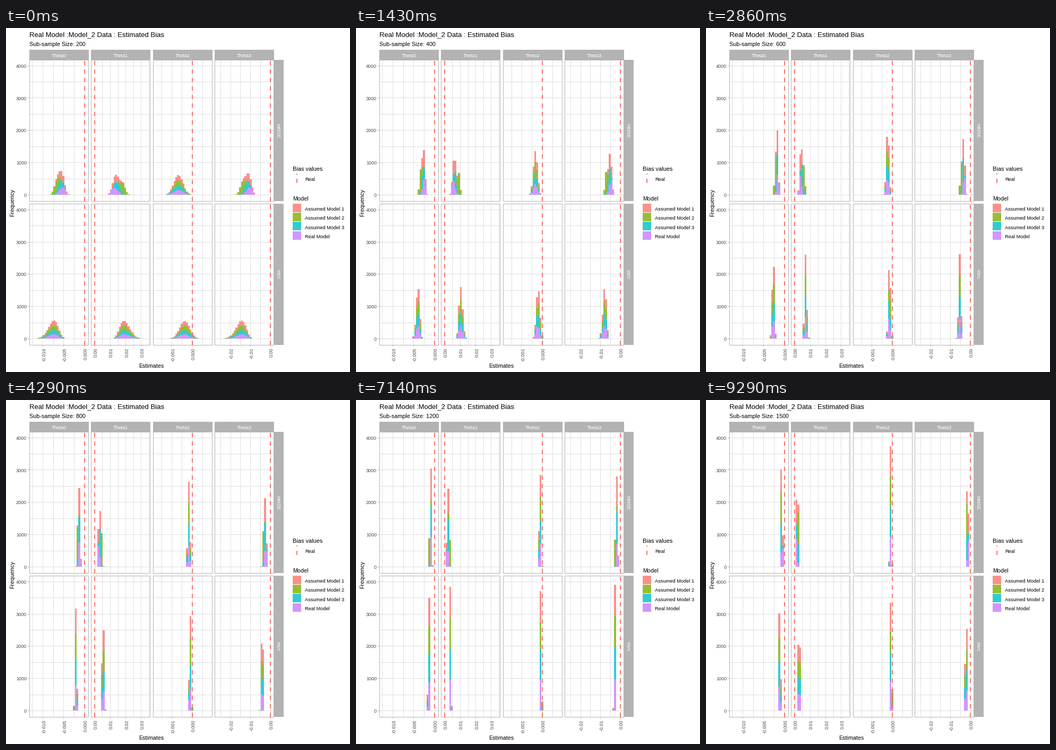
These frames come from a looping animation (648x648 px, 10000 ms). A matplotlib script:

```python
import math

import matplotlib.pyplot as plt
from matplotlib.animation import FuncAnimation
from matplotlib.collections import PolyCollection
from matplotlib.patches import Rectangle

plt.rcParams["font.family"] = "Liberation Sans"

SIZE = 648
LOOP_MS = 10000
FRAMES = 200
SIZES = range(200, 1501, 100)
DRAWS = 1000

GREY, GRID, TICK_TEXT = "#B3B3B3", "#DEDEDE", "#4D4D4D"
RED = "#F8766D"
# Stacked from the baseline upwards
FILLS = ["#C77CFF", "#00BFC4", "#7CAE00", "#F8766D"]
LABELS = ["Real Model", "Assumed Model 3", "Assumed Model 2", "Assumed Model 1"]

PANEL_W, PANEL_H = 111, 266
LEFTS = [44, 160, 277, 393]
TOPS = [60, 331]
BASES = [314.4, 585.4]
PX_PER_COUNT = 0.0608
BIN = 3.363

# x of zero, direction of the bias, major step in px, tick step, decimals,
# first and last labelled tick
COLUMNS = [
    (148.2, -1, 39.4, 0.005, 3, -2, 0),
    (167.2, 1, 29.2, 0.01, 2, 0, 3),
    (351.0, -1, 38.2, 0.001, 3, -1, 0),
    (498.0, -1, 37.4, 0.01, 2, -2, 0),
]

# Bias in bins at n = 1000: the largest per column, and how far each model
# falls short of it, scaled per column.
SHORTFALL = [1.17, 0.73, 0, 0.97]
LARGEST = [[3.17, 3.17, 1.56, 3.17], [3.97, 3.80, 0.85, 3.72]]
SCALE = [[0.87, 1.25, 0, 1.08], [0, 0, -0.25, 0]]


def bias(row, col, model, n):
    """Centre and spread of one model's estimates, before the 1/n scaling."""
    centre = LARGEST[row][col] - SCALE[row][col] * SHORTFALL[model] * (1 - 70 / n)
    if row == 0:
        return centre, 0.6 / centre * (1 + 70 / n)
    return centre * (1 - 22 / n), 0.19 * (1 + 400 / n)


def phi(z):
    return 0.5 * (1 + math.erf(z / math.sqrt(2)))


def cdf(x, centre, spread, skewed):
    if not skewed:
        return phi((x - centre) / spread)
    return phi(math.log(x / centre) * centre / spread) if x > 0 else 0.0


def panel_bars(row, col, n):
    """Stacked bars of one panel, as one list of boxes per model."""
    zero, sign = COLUMNS[col][:2]
    bars = [[] for _ in FILLS]
    for k in range(-8, 30):
        lo, hi = ((k + d) * n / 1000 for d in (-0.5, 0.5))
        x0, x1 = sorted(round(zero + sign * (k + d) * BIN) for d in (-0.5, 0.5))
        total, below = 0, round(BASES[row])
        for model in range(len(FILLS)):
            shape = (*bias(row, col, model, n), col != 2)
            total += DRAWS * (cdf(hi, *shape) - cdf(lo, *shape))
            above = round(BASES[row] - total * PX_PER_COUNT)
            if above < below:
                bars[model].append([(x0, above), (x1, above), (x1, below), (x0, below)])
            below = above
    return bars


def all_bars(n):
    panels = [panel_bars(row, col, n) for row in range(2) for col in range(4)]
    return [sum(boxes, []) for boxes in zip(*panels)]


fig = plt.figure(figsize=(SIZE / 72, SIZE / 72), dpi=72, facecolor="white")
ax = fig.add_axes([0, 0, 1, 1])
ax.set_xlim(0, SIZE)
ax.set_ylim(SIZE, 0)
ax.axis("off")


def rect(x, y, w, h, color, **kw):
    ax.add_patch(Rectangle((x, y), w, h, fc=color, ec="none", aa=False, **kw))


def line(xs, ys, color, width=1, z=1, **kw):
    ax.plot(xs, ys, color=color, lw=width, zorder=z, solid_capstyle="butt",
            dash_capstyle="butt", snap=False, **kw)


def text(x, y, s, size, color="black", ha="left", angle=0):
    return ax.text(x, y, s, fontsize=size, color=color, ha=ha, va="baseline",
                   rotation=angle, rotation_mode="anchor", zorder=6)


def mid(v):
    """Centre of the pixel that holds v."""
    return math.floor(v) + 0.5


def draw_panel(row, col):
    left, top = LEFTS[col], TOPS[row]
    right, bottom = left + PANEL_W, top + PANEL_H
    zero, _, step = COLUMNS[col][:3]
    for half in range(9):
        y = mid(BASES[row] - half * 500 * PX_PER_COUNT)
        line([left, right], [y, y], GRID)
    for half in range(-6, 9):
        x = mid(zero + half * step / 2)
        if left + 2 < x < right - 1:
            line([x, x], [top, bottom], GRID)
    x = round(zero)
    line([x, x], [bottom, top], RED, 2, 4, linestyle=(0, (4, 4)))
    ax.add_patch(Rectangle((left + 0.5, top + 0.5), PANEL_W, PANEL_H, fill=False,
                           ec=GREY, lw=1, zorder=5, snap=False))


for row in range(2):
    for col in range(4):
        draw_panel(row, col)
    for count in range(0, 4001, 1000):
        y = BASES[row] - count * PX_PER_COUNT
        line([41, 44], [mid(y)] * 2, GREY)
        text(39, y + 3.7, str(count), 9, TICK_TEXT, "right")
    rect(505, TOPS[row], 18, PANEL_H, GREY)
    text(509, TOPS[row] + 133, ("mMSE", "mVc")[row], 9, "white", "center", -90)

for col, (zero, _, step, unit, digits, first, last) in enumerate(COLUMNS):
    rect(LEFTS[col], 41, PANEL_W + 1, 19, GREY)
    text(LEFTS[col] + PANEL_W / 2, 55, f"Theta{col}", 9, "white", "center")
    for k in range(first, last + 1):
        x = zero + k * step
        line([mid(x)] * 2, [597, 600], GREY)
        # An ASCII hyphen is the minus sign here
        text(x + 4.7, 602.5, f"{k * unit:.{digits}f}", 9, TICK_TEXT, "right", 90)

text(44, 16, "Real Model :Model_2 Data : Estimated Bias", 13.15)
subtitle = text(44, 34, "", 10.75)
text(274, 640.5, "Estimates", 10.6, ha="center")
text(15.5, 329, "Frequency", 11, ha="center", angle=90)

text(540, 269, "Bias values", 10.95)
line([548, 548], [292, 284], RED, 2)
line([548, 548], [276, 274], RED, 2)
text(563, 288, "Real", 9.15)
text(540, 325, "Model", 10.75)
for i, (fill, label) in enumerate(zip(FILLS[::-1], LABELS[::-1])):
    y = 330.9 + 17.28 * i
    rect(540, round(y), 16, 16, fill, alpha=0.8)
    text(563, y + 13.3, label, 9.2)

stacks = [
    ax.add_collection(PolyCollection([], facecolors=fill, edgecolors="none",
                                     linewidths=0, alpha=0.8, antialiaseds=False,
                                     snap=False, zorder=3),
                      autolim=False)
    for fill in FILLS
]
bars_by_step = [all_bars(n) for n in SIZES]


def update(i):
    # Each sample size starts on the tick just before its share of the loop
    step = int((i + 0.9) * len(SIZES) / FRAMES)
    subtitle.set_text(f"Sub-sample Size: {SIZES[step]}")
    for stack, boxes in zip(stacks, bars_by_step[step]):
        stack.set_verts(boxes)
    return [subtitle, *stacks]


anim = FuncAnimation(fig, update, frames=FRAMES, interval=LOOP_MS / FRAMES,
                     repeat=True, repeat_delay=0, blit=False)
plt.show()
```
